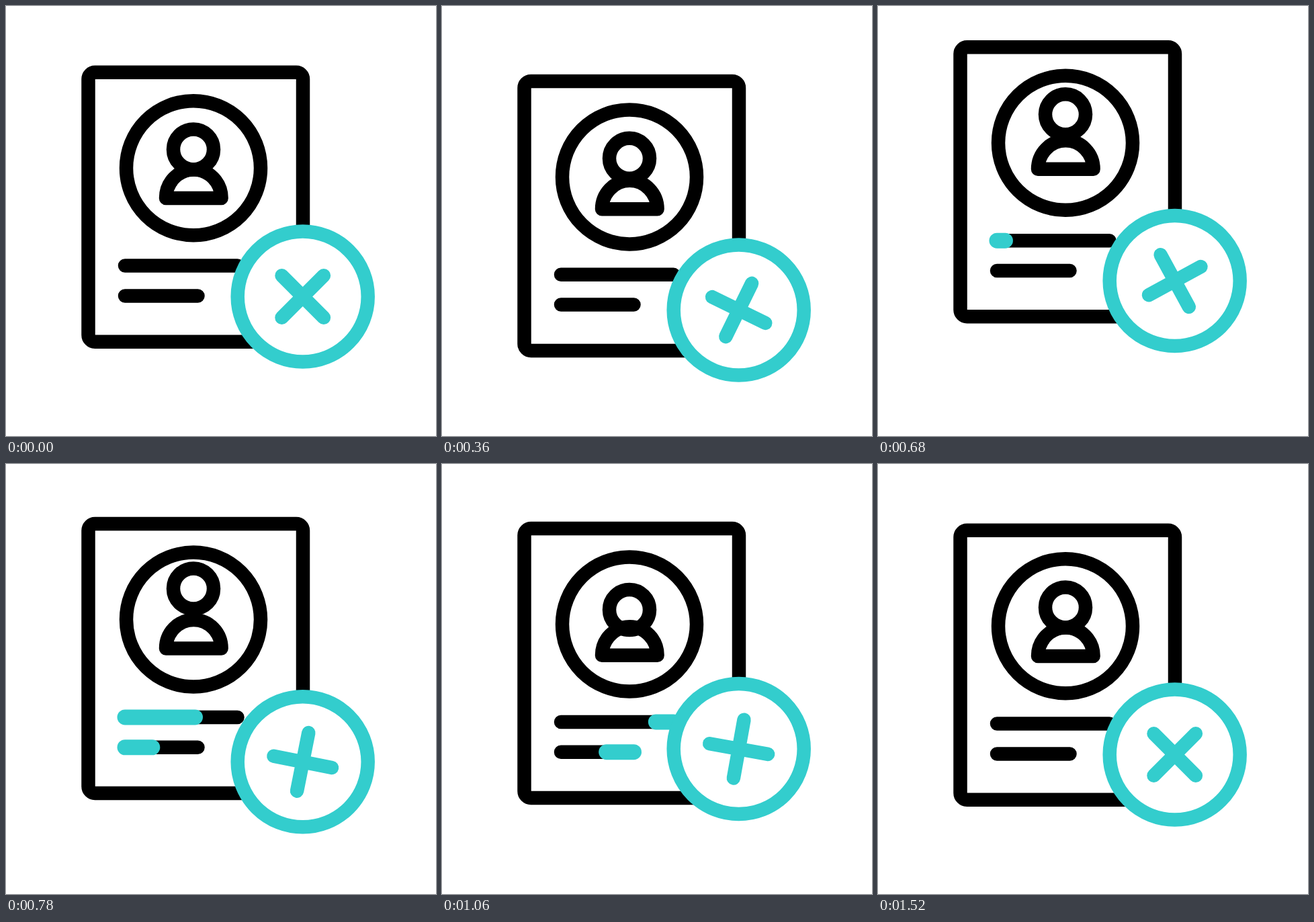
Animation, 640 px wide and 640 px high, one loop 1660 ms. Source, as an HTML page:

```html
<!DOCTYPE html>
<html lang="en">
<head>
<meta charset="utf-8">
<title>Profile rejected</title>
<style>
  html, body { margin: 0; width: 100%; height: 100%; overflow: hidden; background: #fff; }
  svg { display: block; width: 100vw; height: 100vh; }
  svg * { stroke-linecap: round; stroke-linejoin: round; }
  .ink { fill: none; stroke: #000; stroke-width: 20.5; }
  .mark { fill: none; stroke: #33cdcd; stroke-width: 20.5; }
  .wipe { fill: none; stroke: #33cdcd; stroke-width: 23; }
</style>
</head>
<body>
<svg viewBox="0 0 640 640">
  <g id="card">
    <rect class="ink" x="122.5" y="98.7" width="319.5" height="401" rx="10"/>
    <circle class="ink" cx="279" cy="241.2" r="100"/>
    <circle class="ink" id="head" cx="279" cy="213.4" r="30"/>
    <path class="ink" id="body" d="M238 286 A41.3 42.5 0 0 1 320.6 286 Z"/>
    <path class="ink" d="M177 386.6 H344.5 M177 431.4 H285.5"/>
    <path class="wipe" id="line1"/>
    <path class="wipe" id="line2"/>
  </g>
  <g id="badge">
    <circle class="mark" cx="441.7" cy="432.5" r="97" style="fill:#fff"/>
    <path class="mark" id="cross" d="M410.5 401.3 L472.9 463.7 M472.9 401.3 L410.5 463.7"/>
  </g>
</svg>
<script>
const LOOP = 1660, STEP = 20, START = 200, END = 1520;
const RISE = 160, BEAT = 240;
const el = id => document.getElementById(id);
const ease = p => p * p * (3 - 2 * p);
const clamp = p => Math.min(1, Math.max(0, p));
const ramp = (t, from, to) => ease(clamp((t - from) / (to - from)));

// Dips, leaps, dips again and settles; every part shares the beat, each with its own delay
function bounce(id, t, delay, dip, leap, settle) {
  const first = START + delay + RISE;
  let y = dip * ramp(t, START + delay, first);
  [-leap, dip, -settle].forEach((goal, i) => {
    const from = first + i * BEAT;
    y += (goal - y) * ramp(t, from, from + BEAT);
  });
  y *= 1 - ramp(t, first + 3 * BEAT, END);
  el(id).setAttribute('transform', `translate(0 ${y})`);
}

// One counter-clockwise turn, hurried through its middle
function spin(t) {
  const p = clamp((t - START) / (END - START));
  const angle = -360 * ease(p + 0.128 * Math.sin(Math.PI * p) ** 2);
  el('cross').setAttribute('transform', `rotate(${angle} 441.7 432.5)`);
}

// Colour runs in from the left, then leaves to the right
function wipe(id, y, x1, t, start) {
  const x0 = 177, w = x1 - x0;
  const head = ramp(t, start, start + BEAT);
  const tail = ramp(t, start + BEAT, start + 2 * BEAT);
  el(id).setAttribute('d', head > tail ? `M${x0 + w * tail} ${y} H${x0 + w * head}` : '');
}

function draw(t) {
  bounce('badge', t, 0, 20, 38.6, 9);
  bounce('card', t, 60, 19.3, 38.6, 10.4);
  bounce('body', t, 100, 10, 6, 7);
  bounce('head', t, 145, 10, 20, 6);
  spin(t);
  wipe('line1', 386.6, 344.5, t, 640);
  wipe('line2', 431.4, 285.5, t, 680);
}

const begin = performance.now();
function tick() {
  const t = (performance.now() - begin) % LOOP;
  draw(Math.floor(t / STEP) * STEP);
  requestAnimationFrame(tick);
}
tick();
</script>
</body>
</html>
```
